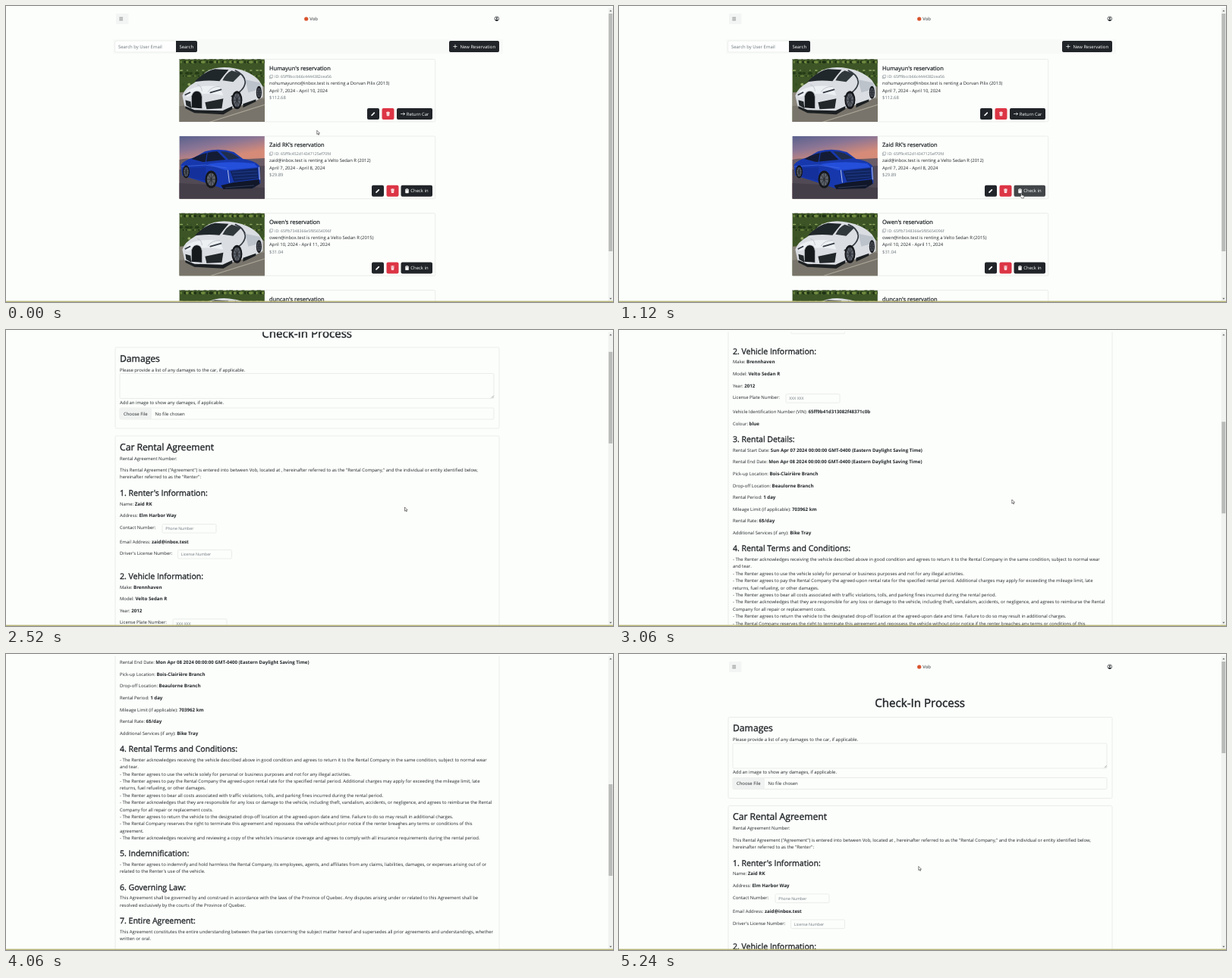
Animation of 800x391 px, one loop 5.27 s. Source, as an HTML page:

```html
<!DOCTYPE html>
<html lang="en">
<head>
<meta charset="utf-8">
<title>Rental check-in</title>
<style>
  html, body { margin: 0; width: 100%; height: 100%; overflow: hidden; background: #fcfefb; }
  svg { display: block; }
  text { font: 5.93px "Open Sans", "Noto Sans", sans-serif; fill: #212529; text-rendering: geometricPrecision; white-space: pre; }
  .b { font-weight: 700; font-size: 6.15px; }
  .h { stroke: #212529; stroke-width: .03em; }
  .h1 { font-size: 15.1px; text-anchor: middle; }
  .h2 { font-size: 12.15px; }
  .h3 { font-size: 10.53px; }
  .h5 { font-size: 7.5px; }
  .s { font-size: 5.19px; fill: #6c757d; }
  .m { fill: #6c757d; }
  .w { fill: #fff; }
</style>
</head>
<body>
<svg id="stage" width="800" height="391" viewBox="0 0 800 391"></svg>
<script>
const LOOP = 5270, OPEN_FORM = 1400;
const DARK = '#212529', RED = '#dc3545', HOVER = '#424649', LINE = '#e3e6e3';

// y is the visual middle of the line; *stars* mark bold runs
const text = (x, y, str, cls = '', drop = 2.1) =>
  `<text x="${x}" y="${y + drop}" class="${cls}">${str.replace(/\*(.+?)\*/g, '<tspan class="b">$1</tspan>')}</text>`;
const h1 = (x, y, str) => text(x, y, str, 'h h1', 5.3);
const h2 = (y, str) => text(150, y, str, 'h h2', 4.2);
const h3 = (y, str) => text(150, y, str, 'h h3', 3.7);
const rect = (x, y, w, h, fill, r = 0, extra = '') =>
  `<rect x="${x}" y="${y}" width="${w}" height="${h}" rx="${r}" fill="${fill}" ${extra}/>`;
const frame = (x, y, w, h, r = 1.5) => rect(x, y, w, h, 'none', r, `stroke="${LINE}" stroke-width=".7"`);
const path = (d, fill, extra = '') => `<path d="${d}" fill="${fill}" ${extra}/>`;
const line = (d, color, width) => path(d, 'none', `stroke="${color}" stroke-width="${width}" stroke-linecap="round" stroke-linejoin="round"`);
const oval = (x, y, rx, ry, fill) => `<ellipse cx="${x}" cy="${y}" rx="${rx}" ry="${ry}" fill="${fill}"/>`;
const at = (x, y, body, id = '') => `<g ${id && `id="${id}"`} transform="translate(${x} ${y})">${body}</g>`;

const icons = {
  pencil: line('M-1.5 1.5L1.3 -1.3', '#fff', 1.7) + path('M-2.8 2.8l.5-1.9 1.4 1.4z', '#fff'),
  trash: path('M-2 -1.4h4l-.4 4.2h-3.2zM-2.4 -2.4h1.4l.4-.6h1.2l.4.6h1.4v.6h-4.8z', '#fff') + line('M-.6 -.6v2.4M.6 -.6v2.4', RED, .35),
  arrow: line('M-2.5 0h5M.9 -1.6L2.5 0 .9 1.6', '#fff', .7),
  board: rect(-2.2, -2.4, 4.4, 5.4, '#fff', .6) + rect(-1, -3, 2, 1.2, '#fff', .3) + line('M-1 -1.3h2', DARK, .5),
  plus: line('M-2.2 0h4.4M0 -2.2v4.4', '#fff', .7)
};
const button = (x, y, w, icon, label = '', fill = DARK, id = '', gap = 12.8) =>
  rect(x, y, w, 15, fill, 2, id && `id="${id}"`) +
  at(x + 8, y + 7.5, icons[icon]) + (label && text(x + gap, y + 7.5, label, 'w'));

const wheel = (x, y, rx, ry) => oval(x, y, rx, ry, '#15171b') + oval(x, y, rx * .7, ry * .75, '#5d626b') +
  [0, 1, 2, 3].map(i => {
    const dx = Math.cos(i * .785) * rx * .65, dy = Math.sin(i * .785) * ry * .7;
    return line(`M${x - dx} ${y - dy}L${x + dx} ${y + dy}`, '#24272d', .8);
  }).join('');

const leaves = [...Array(150)].map((_, i) =>
  oval(i * 47.3 % 113, i * i * 3.7 % 37, 1 + i % 3, .8 + i % 2, ['#243a17', '#6f8a3f', '#354f22', '#93a963', '#1e3014'][i % 5])).join('');

const whiteCar =
  rect(0, 0, 113, 83, '#3d5526') + leaves +
  path('M0 44L113 36V83H0z', '#8b867b') + path('M0 62L113 52V83H0z', '#79746b') + line('M40 83L113 60', '#aaa597', 1.2) +
  path('M4 48Q7 38 20 31L35 17Q48 9 66 11 92 14 105 28L110 36 110 50 99 56 72 64 58 71 20 69 7 62z', '#dadde2') +
  path('M20 30Q33 16 47 13L65 14Q59 21 53 29 36 27 20 30z', '#20272b') +
  path('M57 28Q62 18 69 15L82 19Q76 25 71 30z', '#30383c') +
  line('M69 49Q86 42 87 30 86 20 74 15', '#343b42', 1.8) +
  path('M87 27L106 31 109 39 91 44z', '#bcc3cb') +
  path('M10 42Q24 33 53 36L58 48Q36 42 9 50z', '#edf0f3') +
  line('M24 34Q29 34 30 42M53 36Q42 36 38 43', '#aeb6bf', .7) +
  line('M41 44l14-4M8 47l6-3', '#343b44', 1.8) +
  path('M8 54L15 56 16 65 9 61zM34 57L58 52 56 65 36 66z', '#22272a') +
  path('M16 64V49Q18 42 23 42 29 42 30 50V65z', '#15191c') + line('M16 62V49Q18 42 23 42 29 42 30 50V64', '#b9bec4', .8) +
  wheel(76, 54, 7, 12) + wheel(105, 44, 3.6, 8.5) +
  path('M8 62L20 67 57 68 70 62V66L58 73 20 71 8 65zM84 59L101 53V56L84 64z', '#1c2022');

const blueCar =
  rect(0, 0, 113, 83, 'url(#dusk)') + path('M0 31Q12 27 27 33L113 29V83H0z', '#6a5c66') +
  path('M0 44L113 39V83H0z', '#514a55') + path('M0 62L113 68V83H0z', '#433e48') +
  path('M2 38Q7 31 20 28L34 20Q53 15 72 21L84 30Q102 33 106 40L107 62 96 69 57 69 33 61 4 52z', '#1738ad') +
  path('M16 30Q32 21 50 20L61 31 31 34z', '#141c35') + path('M54 20Q68 20 80 29L65 31z', '#202d4b') +
  line('M37 21L35 34', '#1738ad', 1) +
  path('M37 37Q64 32 99 36L103 41 61 45z', '#244fdb') +
  path('M4 42L35 41 34 59 17 55 4 50z', '#14309b') + line('M3 40L34 38 62 42', '#4269df', .8) +
  path('M67 46L103 42 104 56 72 60z', '#10245f') + line('M64 45l2 16M105 41l1 16', '#dce6ff', .8) +
  line('M70 48l32-2M71 52l32-2M73 56l29-2', '#243f91', .8) +
  path('M55 65L72 61 105 57 106 63 96 69 58 70z', '#111729') + line('M61 68L98 65', '#3b4a6b', .7) +
  wheel(42, 57, 8, 11.5) + wheel(9, 47, 4.5, 8.5);

const card = (y, photo, name, id, rent, dates, price, last) => {
  const checkIn = last === 'Check in';
  const x = checkIn ? 482 : 476;
  return at(0, y,
    frame(228.3, .3, 337.4, 82.6) +
    `<svg x="228.4" y=".3" width="112.4" height="82.6">${photo}</svg>` +
    text(347, 12, name + "'s reservation", 'h h5', 2.5) +
    line('M348.5 21.3h3.2v3.2h-3.2zM347.3 22.5v3.2h3.2', '#6c757d', .45) +
    text(354, 23.4, 'ID: ' + id, 's', 1.9) +
    text(347, 32.2, rent) + text(347, 41.8, dates) + text(347, 51.2, price, 'm') +
    button(x, 65, 16, 'pencil') + button(x + 19.5, 65, 16, 'trash', '', RED) +
    (checkIn ? button(520.5, 65, 41.5, 'board', last, DARK, y < 200 ? 'checkin' : '') : button(515, 65, 47, 'arrow', last)));
};

const header =
  rect(145, 10, 16.5, 14, '#f3f5f4', 1.5) + line('M149.7 15.2h4M149.7 17h4M149.7 18.8h4', '#555', .6) +
  oval(395.7, 17, 2.6, 2.6, '#d9532c') + text(400.3, 17, 'Vob') +
  `<circle cx="646.8" cy="16.8" r="2.8" fill="none" stroke="${DARK}" stroke-width=".7"/>` +
  oval(646.8, 16, 1, 1, DARK) + path('M644.8 18.8q2-2.4 4 0l-2 1.1z', DARK);

const list =
  rect(141, 44, 514, 19, '#f8faf8') + rect(143.5, 46, 81, 15, '#fdfefd', 2, `stroke="${LINE}" stroke-width=".6"`) +
  text(148, 53.7, 'Search by User Email', 'm') +
  path('M224 46h26q2 0 2 2v11q0 2-2 2h-26z', DARK) + text(228.5, 53.7, 'Search', 'w') +
  button(584, 46, 66, 'plus', 'New Reservation', DARK, '', 14.6) +
  card(70, whiteCar, 'Humayun', '65ff9bccb66c4444382cea56', 'nohumayunno@inbox.test is renting a Dorvan Pilix (2013)', 'April 7, 2024 - April 10, 2024', '$112.68', 'Return Car') +
  card(171.7, blueCar, 'Zaid RK', '65ff9c452d14347125ef70fd', 'zaid@inbox.test is renting a Velto Sedan R (2012)', 'April 7, 2024 - April 8, 2024', '$29.89', 'Check in') +
  card(273.4, whiteCar, 'Owen', '65ffb7348366e5f85654096f', 'owen@inbox.test is renting a Velto Sedan R (2015)', 'April 10, 2024 - April 11, 2024', '$31.04', 'Check in') +
  card(375.1, whiteCar, 'duncan', '', '', '', '', 'Check in');

const rows = (y, step, items) => items.map((s, i) => text(150, y + i * step, s)).join('');
const field = (x, y, hint) => frame(x, y - 6, 71, 11.6) + text(x + 4.3, y, hint, 's', 1.9);

const form =
  h1(396.7, 65, 'Check-In Process') +
  frame(144, 83.5, 506, 107) + h2(98, 'Damages') +
  text(150, 113, 'Please provide a list of any damages to the car, if applicable.') +
  frame(150, 118, 493, 33) + line('M639.8 150l2.6-2.6M641.4 150l1-1', '#777', .5) +
  text(150, 156, 'Add an image to show any damages, if applicable.') +
  frame(150, 163.5, 493, 15) + rect(150, 163.5, 42, 15, '#f0f2f1', 1.5) +
  text(155, 171, 'Choose File') + text(196.5, 171, 'No file chosen') +
  frame(144, 200.5, 506, 990) + h2(215, 'Car Rental Agreement') +
  text(150, 230, 'Rental Agreement Number:') +
  rows(245.5, 9.4, [
    'This Rental Agreement ("Agreement") is entered into between Vob, located at , hereinafter referred to as the "Rental Company," and the individual or entity identified below,',
    'hereinafter referred to as the "Renter":']) +
  h3(276, "1. Renter's Information:") +
  rows(290, 15.7, ['Name: *Zaid RK*', 'Address: *Elm Harbor Way*', 'Contact Number:']) +
  field(206, 323, 'Phone Number') +
  rows(340, 15.8, ['Email Address: *zaid@inbox.test*', "Driver's License Number:"]) +
  field(226.5, 357, 'License Number') +
  h3(386, '2. Vehicle Information:') +
  rows(400, 15.65, ['Make: *Brennhaven*', 'Model: *Velto Sedan R*', 'Year: *2012*', 'License Plate Number:']) +
  field(220, 448.3, 'XXX XXX') +
  rows(465.6, 15.7, ['Vehicle Identification Number (VIN): *65ff9b41d313082f48371c0b*', 'Colour: *blue*']) +
  h3(502, '3. Rental Details:') +
  rows(516.2, 15.65, [
    'Rental Start Date: *Sun Apr 07 2024 00:00:00 GMT-0400 (Eastern Daylight Saving Time)*',
    'Rental End Date: *Mon Apr 08 2024 00:00:00 GMT-0400 (Eastern Daylight Saving Time)*',
    'Pick-up Location: *Bois-Clairière Branch*',
    'Drop-off Location: *Beaulorne Branch*',
    'Rental Period: *1 day*',
    'Mileage Limit (if applicable): *703962 km*',
    'Rental Rate: *6$/day*',
    'Additional Services (if any): *Bike Tray*']) +
  h3(646.3, '4. Rental Terms and Conditions:') +
  rows(660.6, 9.4, [
    '- The Renter acknowledges receiving the vehicle described above in good condition and agrees to return it to the Rental Company in the same condition, subject to normal wear',
    'and tear.',
    '- The Renter agrees to use the vehicle solely for personal or business purposes and not for any illegal activities.',
    '- The Renter agrees to pay the Rental Company the agreed-upon rental rate for the specified rental period. Additional charges may apply for exceeding the mileage limit, late',
    'returns, fuel refueling, or other damages.',
    '- The Renter agrees to bear all costs associated with traffic violations, tolls, and parking fines incurred during the rental period.',
    '- The Renter acknowledges that they are responsible for any loss or damage to the vehicle, including theft, vandalism, accidents, or negligence, and agrees to reimburse the Rental',
    'Company for all repair or replacement costs.',
    '- The Renter agrees to return the vehicle to the designated drop-off location at the agreed-upon date and time. Failure to do so may result in additional charges.',
    '- The Rental Company reserves the right to terminate this agreement and repossess the vehicle without prior notice if the renter breaches any terms or conditions of this',
    'agreement.',
    "- The Renter acknowledges receiving and reviewing a copy of the vehicle's insurance coverage and agrees to comply with all insurance requirements during the rental period."]) +
  h3(784.5, '5. Indemnification:') +
  rows(798.9, 9.4, [
    '- The Renter agrees to indemnify and hold harmless the Rental Company, its employees, agents, and affiliates from any claims, liabilities, damages, or expenses arising out of or',
    "related to the Renter's use of the vehicle."]) +
  h3(829, '6. Governing Law:') +
  rows(843.2, 9.4, [
    'This Agreement shall be governed by and construed in accordance with the laws of the Province of Quebec. Any disputes arising under or related to this Agreement shall be',
    'resolved exclusively by the courts of the Province of Quebec.']) +
  h3(873.2, '7. Entire Agreement:') +
  rows(887.5, 9.4, [
    'This Agreement constitutes the entire understanding between the parties concerning the subject matter hereof and supersedes all prior agreements and understandings, whether',
    'written or oral.']);

const dusk = '<linearGradient id="dusk" x2=".25" y2="1">' +
  ['#59618d', '#8a7595', '#d58b78'].map((c, i) => `<stop offset="${i * .22}" stop-color="${c}"/>`).join('') + '</linearGradient>';
const outline = 'stroke="#222" stroke-width=".55" stroke-linejoin="round"';

stage.innerHTML =
  `<defs>${dusk}</defs>` +
  at(0, 0, header + at(0, 0, list, 'list') + at(0, 0, form, 'form'), 'page') +
  rect(0, 0, 800, 2.5, '#fcfefb') +
  rect(793.7, 2.5, 6.3, 387, '#f1f3f1') + rect(794.3, 10, 5, 314, '#b9bbb9', 0, 'id="thumb"') +
  path('M795.3 7.2l1.6-2 1.6 2zM795.3 385.8l1.6 2 1.6-2z', '#666') +
  rect(0, 389.6, 800, 1.4, '#b8b578') +
  at(0, 0,
    path('M0 0V5.2L1.2 4.1 2 6 2.9 5.6 2.1 3.8H3.7z', '#fff', outline + ' id="arrow"') +
    path('M0 .4Q.6-.4 1.2.4V2.4l2.6.8q.5.3.3 1.3L3.6 6.5H.9L-1 4q-.2-1 .6-.7l.4.4z', '#fff', outline + ' id="hand"') +
    `<g id="beam">${line('M.2 0h2M1.2 0v6M.2 6h2', '#333', .5)}</g>`, 'cursor');

const scrollKeys = [[0, 0], [2400, 0], [2520, 60], [3060, 357], [3290, 521], [4090, 521], [4450, 323], [5040, 0], [LOOP, 0]];
const cursorKeys = [[0, 409.8, 164.3], [200, 409.8, 164.3], [980, 529.8, 247.3], [1500, 529.8, 247.3], [2500, 525.5, 234],
  [3060, 517.8, 224], [4060, 516.8, 224], [4450, 513, 221.5], [4800, 506, 223], [5230, 394.8, 280.5], [LOOP, 394.8, 280.5]];

const smooth = u => u * u * (3 - 2 * u);
function sample(keys, t, ease = u => u) {
  const i = keys.findIndex(k => k[0] > t), a = keys[i - 1], b = keys[i];
  const u = ease((t - a[0]) / (b[0] - a[0]));
  return a.slice(1).map((v, j) => v + (b[j + 1] - v) * u);
}
const el = id => document.getElementById(id);
const show = (id, on) => el(id).setAttribute('display', on ? 'inline' : 'none');
const move = (id, x, y) => el(id).setAttribute('transform', `translate(${x} ${y})`);

function draw() {
  const t = performance.now() % LOOP;
  const [scroll] = sample(scrollKeys, t), [x, y] = sample(cursorKeys, t, smooth);
  const onForm = t >= OPEN_FORM;
  const hover = !onForm && x > 520.5 && y > 236.7;
  const onText = scroll > 515;
  show('list', !onForm);
  show('form', onForm);
  move('page', 0, -scroll);
  el('checkin').setAttribute('fill', hover ? HOVER : DARK);
  el('thumb').setAttribute('y', 10 + scroll * .311);
  el('thumb').setAttribute('height', onForm ? 121 : 314);
  show('hand', hover);
  show('beam', onText);
  show('arrow', !hover && !onText);
  move('cursor', x, y);
  requestAnimationFrame(draw);
}
draw();
</script>
</body>
</html>
```
